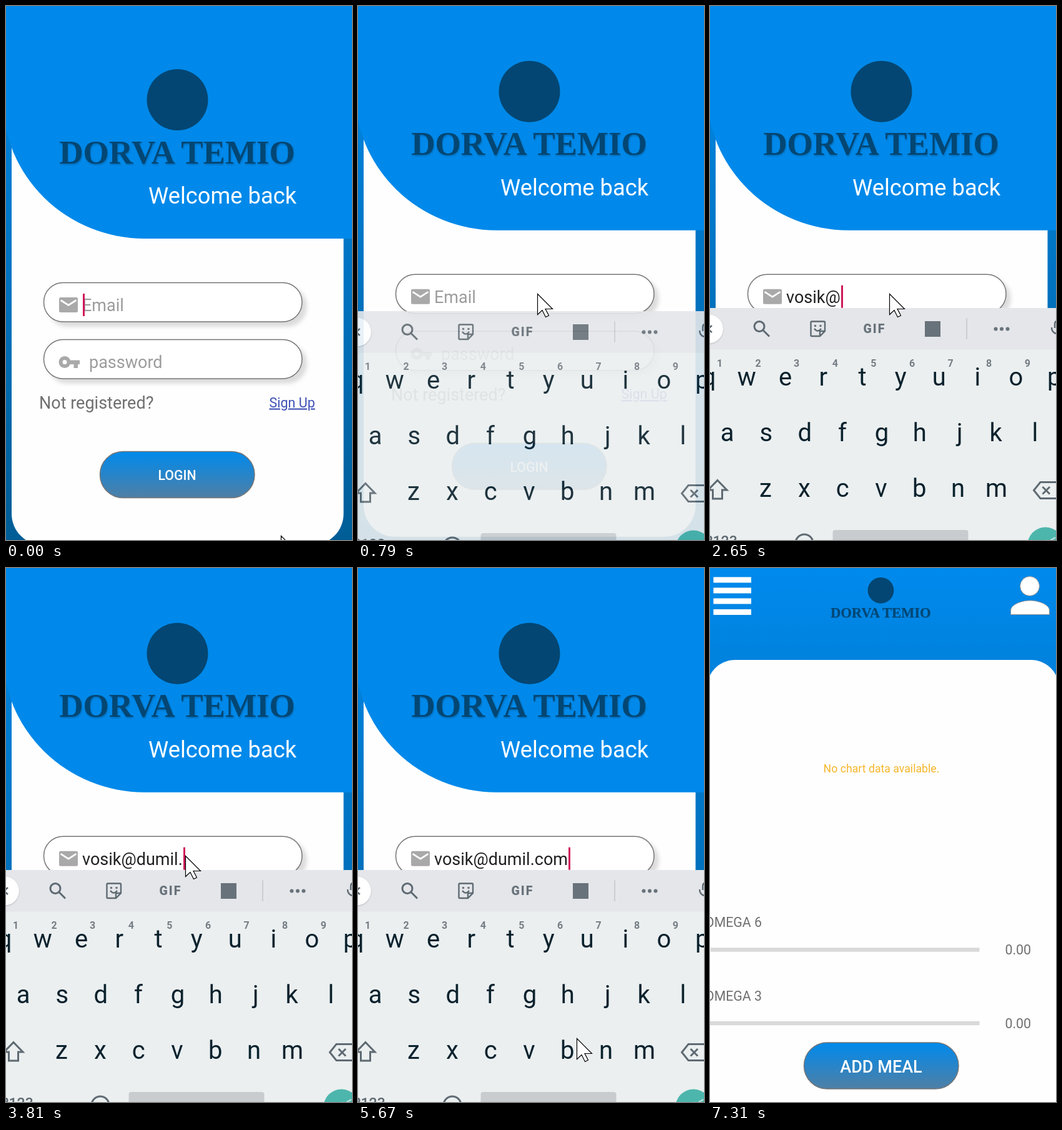
Animation, 554 px wide and 854 px high, one loop 7.39 s. Source, as an HTML page:

```html
<!DOCTYPE html>
<html lang="en">
<head>
<meta charset="utf-8">
<title>Login screen</title>
<style>
  html, body { margin: 0; width: 100%; height: 100%; overflow: hidden; }
  svg { display: block; width: 554px; height: 854px; font-family: Roboto, sans-serif; }
  .brand { font: bold 53px "Liberation Serif", serif; fill: #034673; filter: drop-shadow(1px 2px 1px #0003); }
  .field { fill: #fff; stroke: #757575; stroke-width: 1.5; filter: drop-shadow(7px 7px 3px #0002); }
  .button { fill: url(#press); stroke: #757575; stroke-width: 1.5; }
  .label { fill: #fff; font-weight: 500; font-size: 21.3px; text-anchor: middle; }
  .body { font-size: 27px; fill: #6f6f6f; }
  .hint { fill: #9c9c9c; }
  .small { font-size: 21.3px; fill: #6f6f6f; }
  #keys { font-size: 40px; fill: #0b222d; }
  #keys .digit { font-size: 16px; font-weight: 700; fill: #757d84; text-anchor: middle; }
  .line { fill: none; stroke: #5f6a72; stroke-width: 3; }
  .thin { stroke-width: 2.4; }
</style>
</head>
<body>
<svg viewBox="0 0 554 854">
  <defs>
    <linearGradient id="page" x2="0" y2="1">
      <stop stop-color="#008aed"/><stop offset="1" stop-color="#005d96"/>
    </linearGradient>
    <linearGradient id="press" x2="0" y2="1">
      <stop stop-color="#008aec"/><stop offset="1" stop-color="#4f7fa5"/>
    </linearGradient>
    <g id="logo">
      <circle cx="274.5" cy="150" r="49" fill="#034673"/>
      <text class="brand" x="274" y="251.5" text-anchor="middle">DORVA TEMIO</text>
    </g>
  </defs>

  <rect width="554" height="854" fill="url(#page)"/>

  <g id="login">
    <rect x="9" y="100" width="531.5" height="762" rx="50" fill="#fefefe"/>
    <path d="M-5 -10V150A227 222 0 0 0 222 372H554V-10Z" fill="#0089ea"/>
    <use href="#logo"/>
    <text x="228" y="316" font-size="36.3" fill="#fff">Welcome back</text>

    <rect class="field" x="60.5" y="442.5" width="413.5" height="62.5" rx="31"/>
    <rect x="85" y="466" width="30" height="24" rx="2.5" fill="#a9a9a9"/>
    <path d="M87.5 470.5L100 478.5L112.5 470.5" fill="none" stroke="#fff" stroke-width="2.7"/>
    <text id="email" class="body" x="122" y="488"></text>
    <rect id="caret" y="460" width="3" height="36" fill="#d0185a"/>

    <rect class="field" x="60.5" y="533.5" width="413.5" height="62.5" rx="31"/>
    <circle cx="94" cy="569.5" r="6.5" fill="none" stroke="#a9a9a9" stroke-width="6"/>
    <path d="M102 566.5H118V573H115V579H108.5V573H102Z" fill="#a9a9a9"/>
    <text id="passHint" class="body hint" x="133" y="579">password</text>
    <path id="dots" d="M138 569.5H186" stroke="#212121" stroke-width="6.4" stroke-linecap="round" stroke-dasharray="0 9.3"/>

    <text class="body" x="53" y="644">Not registered?</text>
    <text x="421.5" y="641.5" font-size="21.5" fill="#3f51b5" text-decoration="underline">Sign Up</text>
    <rect class="button" x="150.5" y="712.5" width="247.5" height="74" rx="37"/>
    <text id="action" class="label" x="274" y="758"></text>
  </g>

  <g id="keyboard">
    <rect y="483" width="554" height="67" fill="#e4e6ea"/>
    <rect y="549.5" width="554" height="320" fill="#ebeff0"/>
    <circle cx="-2" cy="516.5" r="23" fill="#fff" filter="drop-shadow(0 1px 1px #0003)"/>
    <path id="chevron" class="line thin"/>
    <g id="tools" fill="#68727a">
      <circle class="line" cx="79" cy="512.5" r="8"/>
      <path class="line" d="M85 518.5L95 528.5"/>
      <path class="line thin" d="M163 504.5H182.5Q184 504.5 184 506V520L176 528H163Q161.5 528 161.5 526.5V506Q161.5 504.5 163 504.5ZM184 520H176V528"/>
      <path class="line thin" d="M167 516Q172.5 523 178 516"/>
      <circle cx="168.5" cy="511.5" r="1.8"/><circle cx="177" cy="511.5" r="1.8"/>
      <text x="263.5" y="523" font-size="19.5" font-weight="900" text-anchor="middle" letter-spacing="2">GIF</text>
      <rect x="344" y="504" width="25" height="25"/>
      <path d="M411 499.5V533" stroke="#c3c7cb" stroke-width="1.5"/>
      <circle cx="457.5" cy="516.5" r="3"/><circle cx="467" cy="516.5" r="3"/><circle cx="476.5" cy="516.5" r="3"/>
    </g>
    <path class="line thin" d="M547 514Q547 523 556 524M556 504Q552 504 552 509V515"/>
    <g id="keys"></g>
    <path class="line" d="M12 758.5L27 774H19.5V788H4.5V774H-3Z"/>
    <path class="line" d="M556 761.5H529L518.5 774.5L529 787.5H556M532.5 769L544 780.5M544 769L532.5 780.5"/>
    <text x="18.5" y="863.5" font-size="23" font-weight="500" fill="#5f6a72" text-anchor="middle">?123</text>
    <circle class="line" cx="151" cy="859" r="14"/>
    <rect x="196.5" y="838" width="217" height="40" rx="4" fill="#c8cccf"/>
    <circle cx="537" cy="862" r="28.5" fill="#4db6ac"/>
    <path d="M538 854L541 857L553 850" fill="none" stroke="#b9e2dd" stroke-width="2.5"/>
  </g>

  <g id="home">
    <rect width="554" height="854" fill="url(#page)"/>
    <rect x="-5" y="147" width="564" height="735" rx="45" fill="#fefefe"/>
    <path d="M5.5 19H66M5.5 36H66M5.5 53H66M5.5 70.5H66" stroke="#fff" stroke-width="9"/>
    <use href="#logo" transform="translate(156.7 -28) scale(.4255)"/>
    <g fill="#fff" stroke="#8a8f94">
      <circle cx="512" cy="29" r="15.5"/>
      <path d="M481.5 74.5V68C481.5 58 500 52 512.5 52S543.5 58 543.5 68V74.5Z"/>
    </g>
    <text x="274.5" y="327" font-size="17.7" fill="#f6b62b" text-anchor="middle">No chart data available.</text>
    <text class="small" x="-8" y="574">OMEGA 6</text>
    <text class="small" x="-8" y="692">OMEGA 3</text>
    <path d="M1 610.5H431.5M0 728H431.5" stroke="#d9d9d9" stroke-width="6.5"/>
    <text class="small" x="472.5" y="618">0.00</text>
    <text class="small" x="472.5" y="736">0.00</text>
    <rect class="button" x="150.5" y="759" width="247.5" height="74" rx="37"/>
    <text class="label" x="274" y="807" style="font-size:27px">ADD MEAL</text>
  </g>

  <path id="pointer" d="M0 0V33L7.5 26L13 37L18 34.5L12.5 24H24Z" fill="#fff" stroke="#000" stroke-width="1.2"/>
</svg>
<script>
const LOOP = 7390, ADDRESS = 'vosik@dumil.com', PITCH = 61.6;
const $ = id => document.getElementById(id);
const show = (id, on) => { $(id).style.display = on ? '' : 'none'; };
const within = (t, from, to) => t >= from && t < to;

// Time at which each character of the address is typed
const typed = [1490, 1605, 1720, 1835, 1950, 2410, 2880, 3110, 3230, 3350, 3580, 3810, 3930, 4050, 4300];

// [time, x, y] of each pointer hop
const hops = [
  [0, 440, 847], [70, 424, 770], [190, 370, 610], [310, 315, 490], [430, 292, 436], [550, 287, 460],
  [5333, 306, 590], [5450, 332, 726], [5560, 350, 752], [5680, 362, 763], [6600, 367, 768], [6715, 372, 772]
];

// Letters are centred on their visible shape, not on their advance width
const ruler = document.createElement('canvas').getContext('2d');
ruler.font = '40px Roboto, sans-serif';
function inkCentre(char) {
  const size = ruler.measureText(char);
  return (size.actualBoundingBoxRight - size.actualBoundingBoxLeft) / 2;
}
const letters = (chars, x, y) => [...chars].map((c, i) =>
  `<text x="${x + PITCH * i - inkCentre(c)}" y="${y}">${c}</text>`).join('');
const digits = [...'123456789'].map((c, i) =>
  `<text class="digit" x="${15.5 + PITCH * i}" y="577">${c}</text>`).join('');
$('keys').innerHTML = letters('qwertyuiop', -2.8, 607) + letters('asdfghjkl', 27.8, 696) +
  letters('zxcvbnm', 89, 785) + digits;

function draw(t) {
  const keyboard = within(t, 790, 5680);
  const opening = t < 900;
  show('keyboard', keyboard);
  $('keyboard').setAttribute('opacity', opening ? .91 : 1);
  $('keyboard').setAttribute('transform', `translate(0 ${opening ? 5 : 0})`);
  $('login').setAttribute('transform', `translate(0 ${keyboard ? -13.3 : 0})`);

  const suggesting = within(t, 1490, 2530);
  $('tools').setAttribute('opacity', suggesting ? 0 : within(t, 2530, 2650) ? .6 : 1);
  $('chevron').setAttribute('d', suggesting ? 'M-4 511L2 516.5L-4 522' : 'M3 511L-3 516.5L3 522');

  const count = typed.filter(time => t >= time).length;
  const email = $('email');
  email.textContent = ADDRESS.slice(0, count) || 'Email';
  email.style.fill = count ? '#212121' : '#9c9c9c';
  $('caret').setAttribute('x', 123 + (count ? Math.round(email.getComputedTextLength()) : 0));
  show('caret', t < 310 || within(t, 1260, 4760) || within(t, 5220, 5680));

  const filled = t >= 5680;
  show('dots', filled);
  show('passHint', !filled);
  $('action').textContent = t < 6030 ? 'LOGIN' : 'PLEASE WAIT';

  const [, x, y] = hops.filter(hop => t >= hop[0]).pop();
  $('pointer').setAttribute('transform', `translate(${x + .5} ${y + .5})`);
  show('pointer', t < 6830);

  show('home', t >= 7080);
  $('home').setAttribute('opacity', t < 7195 ? .5 : t < 7310 ? .9 : 1);
}

const start = performance.now();
(function tick() {
  draw((performance.now() - start) % LOOP);
  requestAnimationFrame(tick);
})();
</script>
</body>
</html>
```
